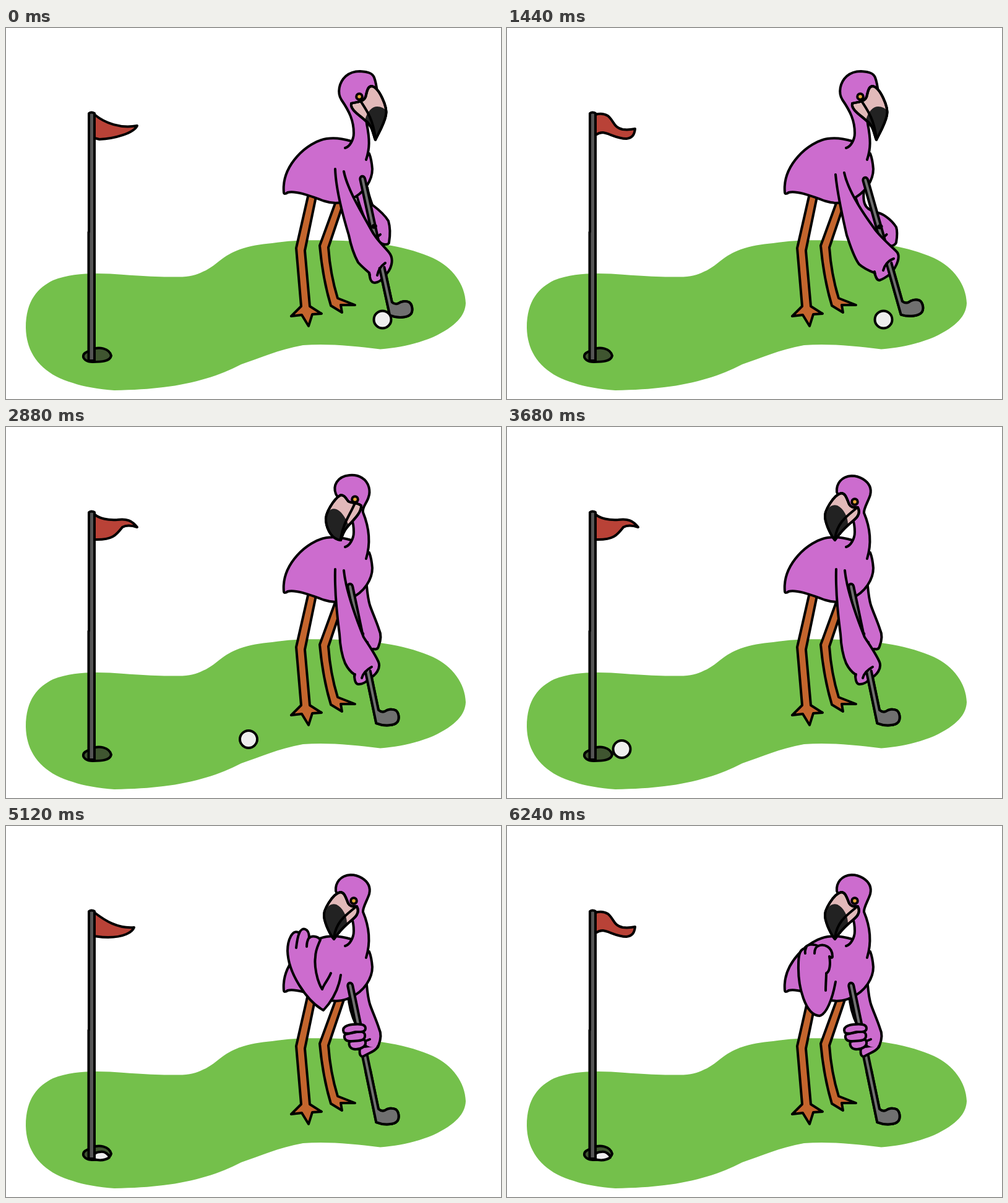
An HTML page for the animation above (6320 ms loop, 800 by 600 pixels).

```html
<!DOCTYPE html>
<html lang="en">
<head>
<meta charset="utf-8">
<title>Flamingo golf</title>
<style>
  html, body { margin: 0; width: 100%; height: 100%; overflow: hidden; background: #fff; }
  svg { display: block; width: 800px; height: 600px; }
  .ink { stroke: #000; stroke-width: 4; stroke-linecap: round; stroke-linejoin: round; }
  .skin { fill: #cc6cce; }
  .leg { fill: #c4652d; }
  .steel { fill: #707070; }
  .line { fill: none; }
</style>
</head>
<body>
<svg viewBox="0 0 800 600">
  <path fill="#74c04b" d="M32 485C32 440 52 420 76 408C110 395 150 396 190 399C230 402 260 403 285 402.500C302 402 312 397 323 392C342 382 350 368 378 358C395 352 410 350 430 348C470 342 500 343 545 344C600 346 650 354 690 372C722 387 742 415 743 445C742 465 728 482 690 500C660 512 635 517 605 519.500C560 514 520 510 480 513C440 520 410 534 380 544C330 570 270 585 175 586C150 584 125 580 108 574C60 560 33 530 32 485Z"/>

  <path class="ink" fill="#3f5530" d="M125 530C125 525 132 524 136 521C150 514 167 518 170 530C168 539 155 540 140 540C130 540 124 535 125 530Z"/>
  <path id="sunk" class="ink" fill="#eee" d="M142 539C140 529 147 527 153 527C160 526 166 531 167 536C160 541 150 541 142 539Z"/>
  <path id="flag" class="ink" fill="#b94237"/>
  <path class="ink" fill="#555" d="M134 138Q138 135 143 138V538H133.500V330H134Z"/>

  <path class="ink leg" d="M489 268L469 356L477 450L461 466L478 464L489 482L495 463L510 462L491 450L483 360L502 268Z"/>
  <path class="ink leg" d="M534 278L507 352Q512 406 525 449L543 460L541 448L564 448L536 437Q524 398 521 355L547 278Z"/>

  <path id="far" class="ink skin"/>
  <path class="ink skin" d="M558 183C545 179 530 177 518 179C487 184 445 222 449 266C449 269 453 268 455 266C470 262 500 275 515 280C530 285 545 283 555 278C580 268 592 245 592 228C591 215 589 208 587 203"/>

  <path id="head" class="ink skin"/>
  <path id="beak" class="ink" fill="#e2b9b9"/>
  <path id="tip" fill="#222"/>
  <path id="rim" class="ink line"/>
  <path id="mouth" class="ink line"/>
  <circle id="eye" class="ink" fill="#e8a838" r="4.800"/>

  <path id="club" class="ink steel"/>
  <g id="thumb">
    <ellipse cx="2" cy="80" rx="5" ry="4"/>
    <path class="ink line" d="M5 97L9 95"/>
  </g>
  <g id="fingers" class="ink skin">
    <path d="M572 360C570 372 575 375 580 371C590 366 600 362 601 356"/>
    <path d="M555 349C553 356 558 362 566 361C574 361 582 356 581 350C581 344 575 345 570 345Z"/>
    <path d="M548 337C545 342 548 348 556 348C566 347 578 349 580 341C581 335 578 333 572 332Z"/>
    <path d="M546 334C542 326 550 322 560 321C570 320 581 320 581 327C581 334 572 333 565 333C558 334 550 338 546 334Z"/>
    <path class="line" d="M583 347L588 345"/>
  </g>
  <path id="near" class="ink skin"/>
  <path id="grip" class="ink steel"/>
  <path id="marks" class="ink line"/>
  <circle id="ball" class="ink" fill="#eee" r="14"/>
</svg>

<script>
const LOOP = 6320, STEP = 80;
const el = id => document.getElementById(id);
const draw = (id, d) => el(id).setAttribute('d', d);
const show = (id, on) => { el(id).style.display = on ? '' : 'none'; };

const flags = [
  'M143 140C160 154 185 163 212 158C207 170 175 179 151 180L143 178Z',
  'M143 141C150 148 165 151 180 150C195 148 203 151 212 162C203 159 195 158 188 162C178 175 172 183 143 182Z',
  'M143 139C160 136 172 141 183 149C192 155 197 162 209 160C206 166 198 167 192 167C185 165 178 164 172 166C160 170 153 177 143 181Z',
  'M143 140C150 138 158 139 163 142C173 150 172 161 187 164C195 165 202 164 207 163C206 172 203 178 193 179C177 179 165 170 155 169C150 169 146 171 143 173Z',
  'M143 140C160 153 180 166 207 164C204 172 190 180 165 180C155 180 150 179 143 178Z'
];

// Head poses: head and neck | beak | dark tip | mouth | eye
const looks = {
  ball: `M548 194C556 192 562 180 562 170C562 150 555 135 542 116C535 105 538 88 549 78C557 71 565 70 572 70C586 71 592 73 595 80C598 88 599 95 600 105C595 125 580 140 583 155C588 180 588 195 582 213
    |M558 122C567 119 580 121 582 108C584 99 586 94 591 94C603 96 617 128 614 141C611 156 601 172 597 181C593 172 593 158 580 149C570 140 556 132 558 122Z
    |M580 149C584 134 592 127 600 127C606 127 612 130 614 134L614 141C611 156 601 172 597 181C593 172 593 158 580 149Z
    |M573 118C582 132 593 146 597 178|571 111`,
  turn: `M548 194C556 192 562 180 562 170C562 160 561 155 559 150C552 135 536 115 533 108C528 95 535 80 555 78C565 77 570 79 575 82C588 90 589 105 586 113C584 122 575 130 577 138C588 165 589 190 582 213
    |M574 127C566 121 558 124 553 120C549 115 547 110 541 110C530 116 515 140 517 152C519 168 528 182 541 183C544 174 546 168 553 160C562 150 575 138 574 127Z
    |M553 157C548 146 542 136 534 133C529 131 524 133 521 137L517 152C519 168 528 182 541 183C544 174 546 168 553 160Z
    |M564 123C556 142 545 155 541 180|564 117`,
  hole: `M548 194C556 192 562 180 562 170C562 160 561 155 559 150C552 135 536 115 533 105C532 92 540 80 557 79C565 79 570 81 575 84C588 92 589 102 587 110C584 120 576 132 577 139C588 165 589 190 582 213
    |M567 130C563 129 557 132 553 125C548 112 546 107 540 107C528 110 512 136 514 147C516 160 524 176 530 183C536 174 543 166 552 158C560 151 574 143 567 130Z
    |M551 157C551 145 544 132 534 127C528 125 523 127 519 132L514 147C516 160 524 176 530 183C536 174 543 166 552 158Z
    |M565 131C551 143 534 153 530 180|562 121`
};

// Arm poses: far arm | near arm | finger lines | club x, y, angle, start of the part over the hand
const restFar = 'M553 272C554 290 559 308 566 322C570 345 580 362 594 359C598 360 601 359 602 355C606 345 607 336 603 328C599 315 592 300 588 288C585 278 584 268 583 257';
const restClub = '556 257 11.800 141';
const arms = {
  address: `M566 268C572 290 580 312 590 328C596 340 606 350 612 350C616 350 619 349 619 347C621 335 621 322 618 312C612 302 600 292 592 286C590 280 586 270 584 258
    |M532 228C533 258 544 302 554 335C558 355 563 368 569 379C576 387 583 392 587 396C588 404 589 412 596 412C602 411 607 409 611 401C623 392 628 374 619 363C612 354 598 342 590 326C576 300 552 262 546 232
    |M600 400C602 390 606 385 613 380M587 396C587 396 587 396 588 400|576 243 12.300 148`,
  lift: `M560 262C566 285 575 305 582 318C592 335 600 345 610 352C620 354 627 352 629 347C631 335 631 328 629 322C620 308 606 300 600 299C585 294 573 292 577 262
    |M531 237C533 260 541 300 549 335C555 352 560 370 569 382C578 390 586 393 594 396C596 402 597 408 602 408C608 406 614 402 619 398C631 385 637 368 629 361C618 350 600 335 592 322C570 292 551 262 545 234
    |M608 392C610 384 616 376 625 373M594 394C594 394 594 394 595 399|579 245 15.800 141`,
  back: `M556 280C557 300 560 308 570 305C590 310 610 318 630 315C640 312 645 306 645 302C641 293 638 283 632 280C622 277 612 276 603 276C595 275 588 274 582 265
    |M530 235C540 252 553 275 563 295C572 310 580 328 591 341C602 346 614 350 625 352C626 358 630 361 635 358C642 352 649 343 655 330C660 324 660 320 659 313C648 302 630 304 612 293C592 275 558 255 540 230
    |M636 357C640 353 643 348 646 344M625 352C625 352 625 352 626 354|570 243 38.300 130`,
  through: `${restFar}
    |M532 230C531 265 535 305 539 335C540 355 543 370 548 382C553 392 558 397 563 400C563 408 564 416 570 416C577 416 582 413 586 407C598 402 606 390 602 380C597 368 586 352 578 340C562 300 549 262 546 232
    |M575 406C577 398 582 393 591 388M564 400C564 400 564 400 563 404|${restClub}`,
  swing: `${restFar}
    |M529 234C526 255 519 268 513 282C500 290 490 300 480 306C472 304 466 305 462 309C452 308 446 312 450 319C444 324 448 334 456 335C466 340 474 340 482 336C500 334 520 328 527 312C535 290 542 265 544 238
    |M473 314C468 313 464 311 462 309M466 323C460 322 455 321 450 319|${restClub}`,
  raised: `${restFar}
    |M525 238C520 250 514 255 511 264C502 250 498 225 500 212C500 200 505 192 508 184C504 178 494 177 490 181C490 164 478 163 474 173C463 165 455 185 455 202C456 238 486 283 513 298C528 282 538 262 541 241
    |M486 195C486 190 487 185 490 180M469 197C470 188 471 180 474 173|${restClub}`,
  chest: `${restFar}
    |M515 266C515 256 516 246 516 238C522 236 523 222 521 211C524 213 526 214 526 211C526 195 512 190 503 194C495 190 484 191 481 198C472 200 471 212 471 225C470 260 482 306 505 307C516 305 526 280 531 252
    |M497 206C497 200 498 196 503 194M482 206C481 202 482 200 484 195|${restClub}`
};

const lookKeys = [[240, 'ball'], [480, 'turn'], [560, 'hole'], [880, 'hole'], [960, 'turn'], [1200, 'ball'],
  [2480, 'ball'], [2800, 'turn'], [2880, 'turn'], [3040, 'hole']].map(([t, k]) => [t, looks[k]]);
const armKeys = [[1280, 'address'], [1440, 'lift'], [1840, 'back'], [2240, 'back'], [2480, 'address'], [2560, 'through'],
  [4560, 'through'], [4720, 'swing'], [4960, 'raised'], [5120, 'raised'], [5600, 'chest']].map(([t, k]) => [t, arms[k]]);
const ballKeys = [[2480, '608.500 471.500'], [2560, '597 473'], [2640, '537 483'], [2720, '482 491'], [2800, '434 499'],
  [2880, '392 505'], [3040, '327 510'], [3200, '281 513'], [3520, '211 518'], [3840, '160 524'], [3920, '154 530']];

// Blends two strings of the same shape, number by number
function mix(a, b, k) {
  if (a === b || k === 0) return a;
  const ends = b.match(/[\d.]+/g);
  let i = 0;
  return a.replace(/[\d.]+/g, n => (+n + (ends[i++] - n) * k).toFixed(2));
}

function at(keys, t) {
  const i = keys.findIndex(key => key[0] > t);
  if (i < 0) return keys[keys.length - 1][1];
  if (i === 0) return keys[0][1];
  const [t0, a] = keys[i - 1], [t1, b] = keys[i];
  return mix(a, b, (t - t0) / (t1 - t0));
}

const numbers = s => s.trim().split(/\s+/).map(Number);
const clubHead = 'L-4 226C8 234 24 236 30 231C35 226 35 216 31 212C26 208 18 208 14 210C10 211 7 210 4 206';

function place(id, x, y) {
  el(id).setAttribute('cx', x);
  el(id).setAttribute('cy', y);
}

function render(t) {
  draw('flag', flags[t / STEP % 5]);

  const [head, beak, tip, mouth, eye] = at(lookKeys, t).split('|');
  draw('head', head);
  draw('beak', beak);
  draw('tip', tip);
  draw('rim', beak);
  draw('mouth', mouth);
  place('eye', ...numbers(eye));

  const [far, near, marks, club] = at(armKeys, t).split('|');
  const [x, y, angle, start] = numbers(club);
  draw('far', far);
  draw('near', near);
  draw('marks', marks);
  draw('club', `M4 2C4 -5 -4 -5 -4 2${clubHead}Z`);
  draw('grip', `M-4 ${start}${clubHead}L4 ${start}`);
  for (const id of ['club', 'grip', 'thumb'])
    el(id).setAttribute('transform', `translate(${x} ${y}) rotate(${-angle})`);

  const released = t > 4560;
  show('thumb', !released);
  show('fingers', released);

  const holed = t > 3920;
  place('ball', ...numbers(at(ballKeys, t)));
  show('ball', !holed);
  show('sunk', holed);
}

const begin = performance.now();
function tick() {
  const t = (performance.now() - begin) % LOOP;
  render(Math.floor(t / STEP) * STEP);
  requestAnimationFrame(tick);
}
tick();
</script>
</body>
</html>
```
